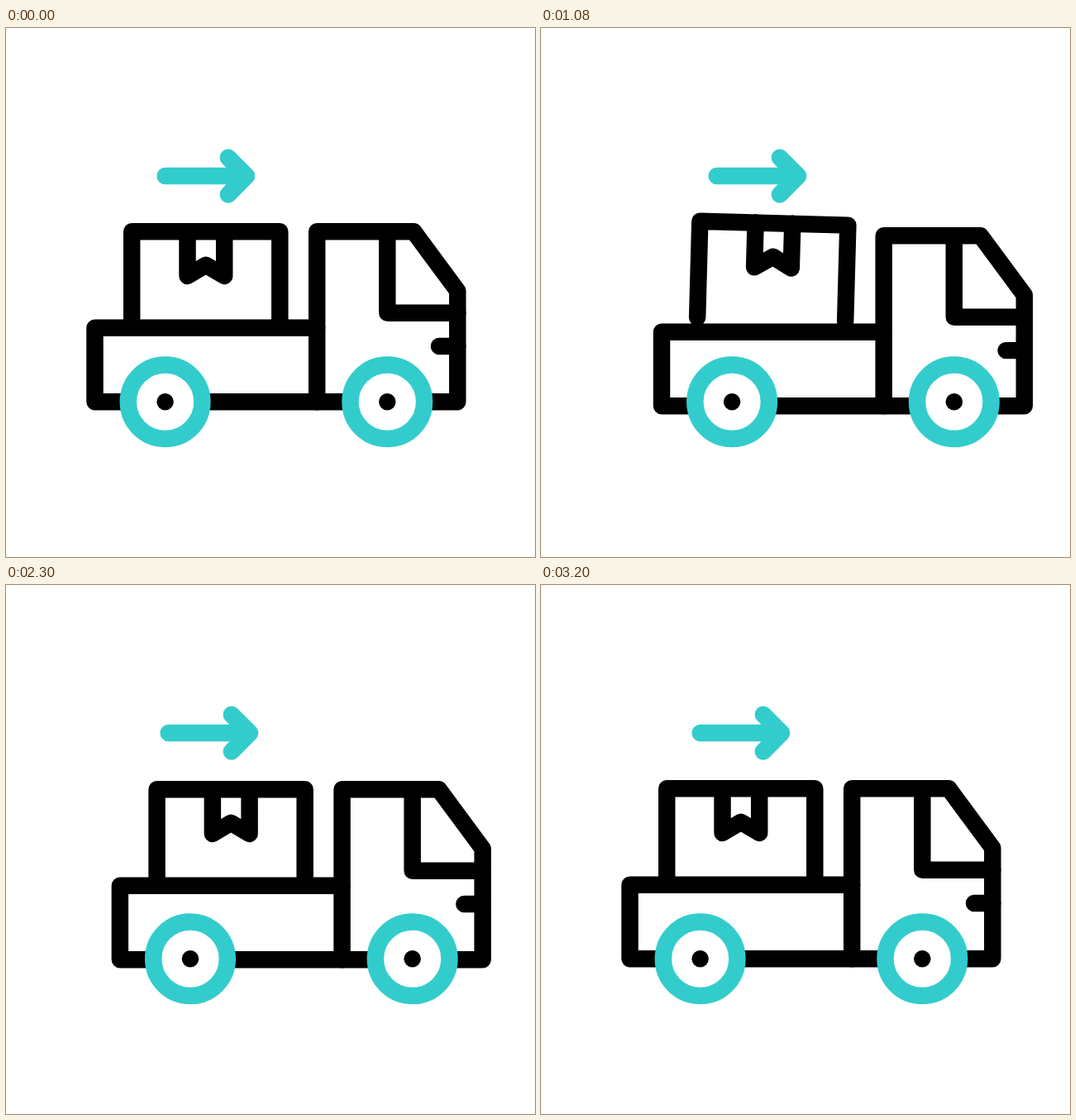
Recreate the animation shown at these times as an HTML page. Size 640x640 px, loop 3.22 s.

```html
<!DOCTYPE html>
<html lang="en">
<head>
<meta charset="utf-8">
<title>Delivery truck</title>
<style>
  html, body { margin: 0; width: 100%; height: 100%; overflow: hidden; background: #fff; }
  svg { display: block; width: 100vw; height: 100vh; }
  .line { fill: none; stroke: #000; stroke-width: 20.48; stroke-linecap: round; stroke-linejoin: round; }
  .teal { stroke: #3cc; }
  .wheel { fill: #fff; }
</style>
</head>
<body>
<svg viewBox="0 0 640 640">
  <path id="arrow" class="line teal" d="M192.6 179.1H291M268.8 156.8L291.1 179.1L268.8 201.4"/>
  <g id="truck">
    <g id="body" class="line">
      <g id="box">
        <path d="M152.2 362.7V246.2H331.3V362.7"/>
        <path d="M219.5 246.2V300L241.8 286.8L264.2 300V246.2"/>
      </g>
      <path d="M376.2 362.7H107.5V452.3H376.2"/>
      <path d="M376.2 246.2H493.2L546.3 318V452.3H376.2Z"/>
      <path d="M461.3 246.2V344.8H546.3M524 385.1H546.3"/>
    </g>
    <circle class="line teal wheel" cx="192.6" cy="452.3" r="44.8"/>
    <circle cx="192.6" cy="452.3" r="10.24"/>
    <circle class="line teal wheel" cx="461.3" cy="452.3" r="44.8"/>
    <circle cx="461.3" cy="452.3" r="10.24"/>
  </g>
</svg>
<script>
  const LOOP = 3220, STEP = 20, CYCLE = 3200, BOUNCE = 800;
  const [arrow, truck, body, box] = ["arrow", "truck", "body", "box"].map(id => document.getElementById(id));

  const ease = p => p * p * (3 - 2 * p);
  // Eased 0 -> 1 -> 0 over one period
  const swing = (t, period) => ease(1 - Math.abs(1 - 2 * (t % period) / period));
  const move = (el, x, y, extra = "") => el.setAttribute("transform", `translate(${x} ${y}) ${extra}`);

  function draw(now) {
    const t = Math.floor((now % LOOP) / STEP) * STEP;
    const bounce = swing(t, BOUNCE);
    // The box hops only during the second bounce
    const hop = t >= BOUNCE && t < 2 * BOUNCE ? bounce : 0;
    move(arrow, 25.6 * bounce, 0);
    move(truck, 51.2 * swing(t, CYCLE), 0);
    move(body, 0, 6.4 * bounce);
    move(box, 0, -19.2 * hop, `rotate(${2 * hop} 241.8 304.5)`);
  }

  const start = performance.now();
  function tick() {
    draw(performance.now() - start);
    requestAnimationFrame(tick);
  }
  tick();
</script>
</body>
</html>
```
